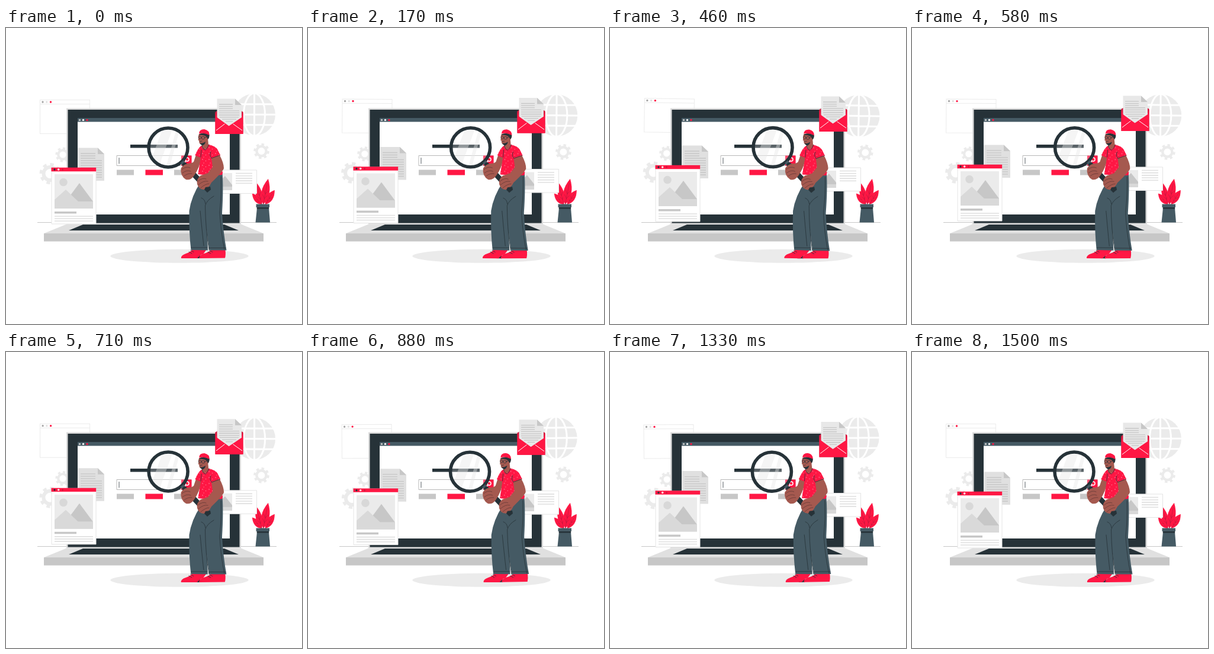
Write an HTML page that moves like this. It is 500 px wide and 500 px high and loops after 1.54 s.

```html
<!DOCTYPE html>
<html lang="en">
<head>
<meta charset="utf-8">
<title>Search illustration</title>
<style>
  html, body { margin: 0; height: 100%; overflow: hidden; background: #fff; }
  svg { display: block; width: 100vw; height: 100vh; }
  .red { fill: #ff1744; } .dark { fill: #263238; } .slate { fill: #455a64; } .skin { fill: #a5594f; }
  .pale { fill: #ebebeb; } .light { fill: #e0e0e0; } .mid { fill: #c7c7c7; } .white { fill: #fff; }
  .line { fill: none; stroke: #263238; stroke-width: .8; stroke-linecap: round; stroke-linejoin: round; }
  .rows { fill: none; stroke: #c7c7c7; stroke-width: 1.3; }
  .card { fill: #fff; stroke: #e4e4e4; }
</style>
</head>
<body>
<svg viewBox="0 0 500 500">
  <defs>
    <g id="gear" fill="none" stroke="#ebebeb">
      <circle r="11" stroke-width="6"/>
      <circle r="15.5" stroke-width="5" pathLength="16" stroke-dasharray="1"/>
    </g>
    <g id="leaf">
      <path class="red" d="M0 0Q-14-19 0-44Q13-19 0 0Z"/>
      <path class="line" stroke-width=".6" d="M0 0V-36M0-10l-4-6M0-10l4-6M0-18l-4-6M0-18l4-6" style="stroke:#a5183a;stroke-width:.5"/>
    </g>
    <pattern id="dots" width="11" height="10" patternUnits="userSpaceOnUse">
      <g fill="#ffb5c3"><circle cx="2" cy="2" r=".65"/><circle cx="7.5" cy="4.5" r=".6"/><circle cx="4" cy="8" r=".6"/></g>
    </pattern>
    <clipPath id="lens"><circle cx="274" cy="202" r="32"/></clipPath>
  </defs>

  <path d="M53 328.5H457" stroke="#c7c7c7"/>
  <g class="sway" data-pivot="255 190">
    <circle class="pale" cx="419.5" cy="146.3" r="35.5"/>
    <g fill="none" stroke="#fff" stroke-width="3">
      <ellipse cx="419.5" cy="146.3" rx="18" ry="36"/>
      <path d="M419.5 110V183M384 146.3H456M388 128.8H452M388 163.8H452"/>
    </g>
    <use href="#gear" x="74.5" y="246"/>
    <use href="#gear" transform="translate(96 214) scale(.7)"/>
    <use href="#gear" transform="translate(431.5 208) scale(.74)"/>
    <path class="card" style="stroke:#ebebeb" d="M57.5 121.5h84v57h-84zM57.5 128.5h84"/>
    <circle cx="62" cy="125" r="1.7" fill="#a6a6a6"/>
    <circle class="light" cx="68.7" cy="125" r="1.7"/>
    <circle class="red" cx="75.5" cy="125" r="1.7"/>
  </g>

  <g>
    <path fill="#dbdbdb" d="M102 135.5H397V331.5H102z"/>
    <path class="dark" d="M104.5 138H394.5V329.5H104.5z"/>
    <path class="white" d="M121 153H378V315H121z"/>
    <path class="slate" d="M121 152H378V158.5H121z"/>
    <circle cx="124.5" cy="155.4" r="1.7" fill="#c7c7c7"/>
    <circle class="white" cx="130.5" cy="155.4" r="1.7"/>
    <circle class="red" cx="137" cy="155.4" r="1.7"/>
    <path class="light" d="M102 331.5H397L435 347H64z"/>
    <path class="mid" d="M64 347H435V360.5H64z"/>
    <path class="dark" d="M130 332H369L393 342H106z"/>
    <path class="dark" d="M210 197H290V202.5H210z"/>
    <path fill="#fff" stroke="#b8b8b8" d="M187 215.5H313V232.5H187z"/>
    <path class="line" d="M191 219.5V229"/>
    <path class="red" d="M296 215.5H313.5V232.5H296zM235.5 239.5h29.5v9h-29.5z"/>
    <circle cx="306" cy="222" r="3" fill="none" stroke="#fff" stroke-width="1.5"/>
    <path d="M304 224.5l-3 4" stroke="#fff" stroke-width="1.5"/>
    <path class="mid" d="M187 239.5h29v9h-29zM284 239.5h29v9h-29z"/>
  </g>

  <path class="slate" d="M424 304H444L446 328.5H421.5z"/>
  <use href="#leaf" transform="translate(432 298) rotate(-41) scale(.72 .56)"/>
  <use href="#leaf" transform="translate(438 298) rotate(33) scale(.85 .66)"/>
  <use href="#leaf" transform="translate(432 298) rotate(-14) scale(.8 .87)"/>
  <use href="#leaf" transform="translate(434.5 298) rotate(11)"/>
  <path class="slate" d="M422.5 297.5H445V303H422.5z"/>
  <path class="dark" d="M423.8 303H444L444.3 305.5H423.6z"/>

  <g id="float">
    <path class="light" d="M121.5 202.5H155L166 213V258H121.5z"/>
    <path class="mid" d="M155 202.5L166 213H155z"/>
    <path class="rows" d="M126 212h25m-25 4h25m-25 4h25m-25 4h36m-36 4h36m-36 4h36m-36 4h36m-36 4h36m-36 4h36m-36 4h36m-36 4h36"/>

    <path class="card" d="M77 236.5H152V331H77z"/>
    <path class="red" d="M76.5 235.8H152.2V242.2H76.5z"/>
    <circle class="dark" cx="82" cy="239" r="1.7"/>
    <circle class="white" cx="88.7" cy="239" r="1.7"/>
    <circle cx="95.5" cy="239" r="1.6" fill="#cf1a40"/>
    <path class="pale" d="M82 247H147V305H82z"/>
    <circle cx="97" cy="260.5" r="6.8" fill="#d8d8d8"/>
    <path class="mid" d="M101 293L124 262L147 293z"/>
    <path fill="#d9d9d9" d="M82 305V290L101 273L122 293H147V305z"/>
    <path class="mid" d="M82 310H119V313.5H82z"/>
    <path class="rows" style="stroke:#e0e0e0;stroke-width:1.6" d="M82 318h65m-65 4h65m-65 4h65"/>

    <path class="card" d="M350 240H423.5V279.5H350z"/>
    <path class="pale" d="M353 245H382V274H353z"/>
    <path class="mid" d="M353 267L370 250L382 265V274H353z"/>
    <path fill="#d9d9d9" d="M353 268H382V274H353z"/>
    <path class="rows" style="stroke:#e0e0e0;stroke-width:1.6" d="M388 245.5h28m-28 4.2h28m-28 4.2h28m-28 4.2h28m-28 4.2h28"/>

    <path fill="#d3143a" d="M353.5 142L358 139H396L400.5 142V179H353.5z"/>
    <path fill="#e8e8e8" d="M356.5 119.5H387L398 130V158L376.5 170L356.5 158z"/>
    <path class="mid" d="M387 119.5L398 130H387z"/>
    <path class="rows" d="M360 129h23m-23 3.6h23m-23 3.6h23m-23 3.6h34m-34 3.6h34m-34 3.6h34m-33 3.6h32m-28 3.6h24m-18 3.6h12"/>
    <path class="red" d="M353.5 142V179H400.5V142L398 151L376.5 165.5L356.5 151z"/>
    <path d="M355 173L369.5 162M399 173L383.5 162" stroke="#fff" stroke-width="1"/>
  </g>

  <ellipse class="pale" cx="293" cy="385.3" rx="116.5" ry="11.5" fill="#e8e8e8"/>
  <g class="sway" data-pivot="306 278">
    <g clip-path="url(#lens)" fill="#fff">
      <circle cx="274" cy="202" r="32" fill-opacity=".24"/>
      <path fill="#e6e6e6" fill-opacity=".4" d="M266 166H283L256 240H239zM289 166H295L275 240H269z"/>
    </g>
    <circle cx="274" cy="202" r="33" fill="none" stroke="#263238" stroke-width="5.6"/>
    <path d="M297 226L304 233.5" stroke="#455a64" stroke-width="7"/>
    <path d="M302 231.5L342 273.5" stroke="#263238" stroke-width="8.5" stroke-linecap="round"/>

    <path class="dark" d="M318 384L328 378V389H318z"/>
    <path class="red" d="M296 389Q295 384 304 381Q311 379 315 374H339L333 382Q328 383 323 389z"/>
    <path class="red" d="M326.5 389Q326 384 334 381Q342 379 346 375H370.5Q371.5 383 370 388.5z"/>
    <path class="line" d="M309 378l5 3M312 375.5l5 3M341 378.5l5 2.500M344 376l5 2.500"/>
    <path class="slate" d="M329 260Q313 284 309.500 309Q309 345 312.500 375L341 375.500L338 300L346 262z"/>
    <path class="slate" d="M329 260L365.500 245Q367.500 270 365 312Q367 345 372.500 375.500L343.500 375.500Q337 335 336.500 298z"/>
    <path class="line" d="M351 284Q339 291 336.500 300Q337 340 343 375M330 287Q336 289 337 297M363 251Q364 280 361 312Q363 345 369 374M313 371h27M343 371.500h28M328 309Q331 340 334 368"/>

    <path class="skin" d="M321 214L330 219Q327 236 318 249Q312 258 304 256Q294 250 295.500 237Q299 231 307 229Q314 229 317 226z"/>
    <path class="line" style="stroke:#663a38" d="M297 239Q304 233 311 236M298 245Q305 239 312 242M301 250Q307 245 314 246"/>
    <path id="shirt" class="red" d="M330 199L343 197Q354 200 357 205L362 215L352 220Q355 233 366 243L365 248Q345 249 324.500 247L329 219L319.500 215Q325 202 330 199z"/>
    <use href="#shirt" style="fill:url(#dots)"/>
    <path fill="url(#dots)" d="M330 199L343 197Q354 200 357 205L362 215L352 220Q355 233 366 243L365 248Q345 249 324.500 247L329 219L319.500 215Q325 202 330 199z"/>
    <path class="skin" d="M347 220L361 215Q368 228 368 237Q366 243 347 261Q343 270 335 273Q326 273 323 264Q321 255 329 249Q336 247 341 245L349 235z"/>
    <path class="dark" d="M337 269L345 268L346 273L340 278L335 273z"/>
    <path class="line" style="stroke:#663a38" d="M324 259Q332 252 338 255M325 265Q334 257 341 259M329 270Q337 263 343 263"/>
    <path class="line" d="M346 209Q343 214 347 220L361 215M330 206L329 218"/>

    <path class="skin" d="M331 193L341 187L342 197Q340 204 335 205Q331 202 331 199z"/>
    <path class="line" d="M331 199Q333 206 337 206Q341 203 342.500 197"/>
    <path class="skin" d="M326 179Q324 183 325 187L324.500 189.500L326 190Q326 196 330 197Q337 196 341 188Q344 185 342 182L337 177z"/>
    <path class="dark" d="M326 181Q328 177 336 178L343.500 180Q344 185 341 188L339 184L336 182Q331 180 326 181zM327 194Q331 196 337 192Q336 198 331 198.500z"/>
    <path class="red" d="M326 178.500Q326 171 335 171Q344 173 343.500 181Q334 176 326 178.500z"/>
    <g class="line" style="stroke-width:.7">
      <circle cx="327.500" cy="185" r="2.300"/><circle cx="333" cy="185.500" r="2.600"/>
      <path d="M335.500 185L340 184M327.500 191.500Q329 192.500 331 191"/>
    </g>
  </g>
</svg>
<script>
  const LOOP = 1540, CYCLE = 1500, LIFT = 6.5;
  const floating = document.getElementById('float');
  const swaying = document.querySelectorAll('.sway');
  const triangle = p => 1 - Math.abs(2 * p - 1);

  function draw(now) {
    const p = Math.min(now % LOOP / CYCLE, 1);
    const angle = 2 * triangle((p + .25) % 1) - 1; // degrees, -1 to 1
    floating.setAttribute('transform', `translate(0 ${-LIFT * triangle(p)})`);
    for (const part of swaying)
      part.setAttribute('transform', `rotate(${angle} ${part.dataset.pivot})`);
    requestAnimationFrame(draw);
  }
  requestAnimationFrame(draw);
</script>
</body>
</html>
```
